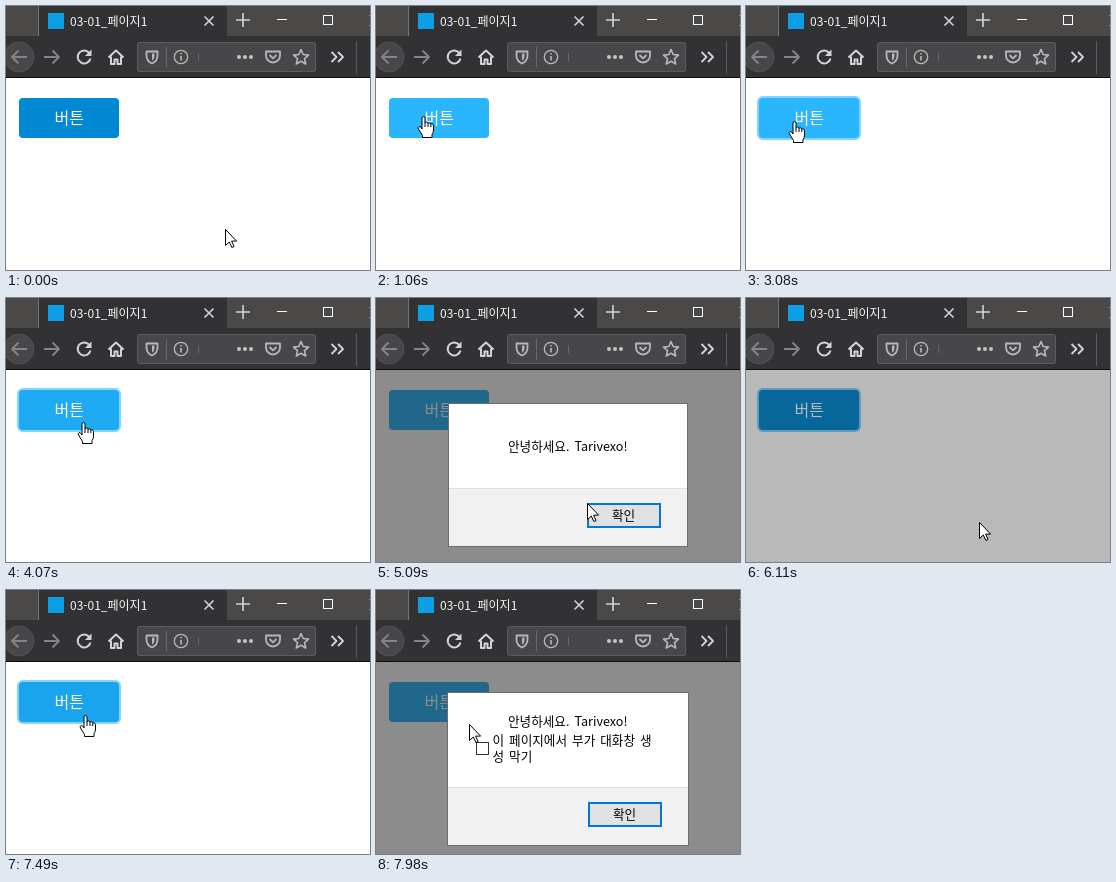
An HTML page for the animation above (8000 ms loop, 364 px wide and 264 px high).

```html
<!DOCTYPE html>
<html lang="ko">
<head>
<meta charset="utf-8">
<title>03-01_페이지1</title>
<style>
html, body { margin: 0; width: 100%; height: 100%; overflow: hidden; background: #fff; }
svg { display: block; width: 364px; height: 264px; }
text { font: 12.6px "Noto Sans CJK KR", "Noto Sans CJK", sans-serif; word-spacing: 1.5px; }
.title { font-size: 12px; fill: #f9f9fa; }
.label { font-size: 16px; fill: #fff; }
.icon { fill: none; stroke: #d4d4d6; stroke-width: 1.8; stroke-linejoin: round; }
.crisp { shape-rendering: crispEdges; }
</style>
</head>
<body>
<svg viewBox="0 0 364 264">
  <rect width="364" height="264" fill="#fff"/>

  <!-- page button -->
  <rect id="ring" x="11" y="90" width="104" height="44" rx="6" fill="#80d4ff"/>
  <rect id="btn" x="13" y="92" width="100" height="40" rx="4"/>
  <text class="label" x="48.5" y="118">버튼</text>
  <rect id="dim" y="72" width="364" height="192" fill="#1a1a1a"/>

  <!-- dialogs -->
  <g id="dlg1">
    <rect x="72.5" y="105.5" width="239" height="143" fill="#fff" stroke="#6c6c6c"/>
    <path class="crisp" d="M73 190h238v58H73z" fill="#f1f1f1"/>
    <path class="crisp" d="M73 190h238v1H73z" fill="#dfdfdf"/>
    <text x="132" y="153">안녕하세요. Tarivexo!</text>
    <rect id="ok" x="212" y="206" width="72" height="23" stroke="#0078d7" stroke-width="2"/>
    <text x="236" y="222">확인</text>
  </g>
  <g id="dlg2">
    <rect x="71.5" y="102.5" width="241" height="153" fill="#fff" stroke="#6c6c6c"/>
    <path class="crisp" d="M72 197h240v58H72z" fill="#f1f1f1"/>
    <path class="crisp" d="M72 197h240v1H72z" fill="#dfdfdf"/>
    <text x="132" y="136">안녕하세요. Tarivexo!</text>
    <text x="116.5" y="155">이 페이지에서 부가 대화창 생</text>
    <text x="116.5" y="171">성 막기</text>
    <rect x="100.5" y="152.5" width="12" height="12" fill="#fff" stroke="#333"/>
    <rect x="213" y="213" width="72" height="23" fill="#e1e1e1" stroke="#0078d7" stroke-width="2"/>
    <text x="237" y="229">확인</text>
  </g>

  <!-- browser bar -->
  <rect width="364" height="30" fill="#4b4947"/>
  <rect y="30" width="364" height="42" fill="#323234"/>
  <rect x="32" width="189" height="30" fill="#323234"/>
  <rect x="32" width="1" height="30" fill="#777573"/>
  <rect y="71" width="364" height="1" fill="#0c0c0d"/>
  <rect x="42" y="7" width="16" height="16" fill="#0d9fe5"/>
  <text class="title" x="64" y="19.5">03-01_페이지1</text>
  <g class="icon">
    <path d="M198.500 10.500l9 9m0-9l-9 9" stroke-width="1.600"/>
    <path d="M230 14h14M237 7v14" stroke-width="1.600"/>
    <path class="crisp" d="M271 13.500h10M317.500 9.500h9v9h-9z" stroke="#fff" stroke-width="1"/>
    <path d="M363.500 9.500l10 10m0-10l-10 10" stroke="#fff" stroke-width="1"/>
    <circle cx="13" cy="51" r="15" fill="#474749" stroke="#525254" stroke-width="1"/>
    <g stroke="#858587">
      <path d="M21 51H6m6.500-6.500L6 51l6.500 6.500"/>
      <path d="M38 51h15m-6.500-6.500L53 51l-6.500 6.500"/>
    </g>
    <path d="M83.500 47.200A6.500 6.500 0 1 0 84.500 52.500" stroke-width="2"/>
    <path d="M85.500 43.500v6.500H79z" fill="#d4d4d6" stroke="none"/>
    <path d="M102.500 51.500l7.500-7 7.500 7M105 50.500v7.500h3.500v-4.500h3v4.500h3.500v-7.500" stroke-width="2"/>
    <rect x="131.500" y="36.500" width="178" height="29" rx="2" fill="#474749" stroke="#5c5c5e" stroke-width="1"/>
    <g stroke="#b8b8ba" stroke-width="1.800">
      <path d="M140.500 45.500h11v4q0 5.500-5.500 8-5.500-2.500-5.500-8z"/>
      <path d="M146 47.500h2.500v2.500q0 3-2.500 4.700z" fill="#b8b8ba" stroke="none"/>
      <circle cx="175" cy="51" r="6.700" stroke-width="1.300"/>
      <path d="M175 50v4.500M175 47v1.600" stroke-width="1.600"/>
      <path d="M260 45.500h14v4a7 7 0 0 1-14 0zM263.500 49l3.500 3.300 3.500-3.300"/>
      <path d="M295 43.500l2.200 5 5.300.6-4 3.600 1.200 5.300-4.700-2.700-4.700 2.700 1.200-5.300-4-3.600 5.300-.6z" stroke-width="1.600"/>
    </g>
    <path class="crisp" d="M160.500 41v21M192.500 47v8" stroke="#68686a" stroke-width="1"/>
    <path class="crisp" d="M350.500 35v33" stroke="#5c5c5e" stroke-width="1"/>
    <path d="M325.500 46l5 5-5 5m6.500-10l5 5-5 5"/>
  </g>
  <g fill="#c4c4c6">
    <circle cx="233" cy="51" r="2"/><circle cx="239" cy="51" r="2"/><circle cx="245" cy="51" r="2"/>
  </g>

  <!-- pointer -->
  <g id="cursor" fill="#fff" stroke="#000" stroke-linejoin="round">
    <path id="arrow" d="M.500 .500V16.500L4.300 13l2.600 5.500 2.200-1-2.500-5.400h5z"/>
    <path id="hand" d="M-2 13V2Q-2 .500-.500 .500T1 2V7Q1 6 2.500 6T4 7.500Q4 6.800 5.300 6.800T6.800 8.300Q7 7.800 8 7.800T9.500 9.500V14Q9.500 17 8 18.500V21.500H-1.500V19.500L-5.500 13Q-6.500 11-5 10.500T-2 13ZM1 7V11M4 7.500V11M6.800 8.300V11"/>
  </g>
</svg>
<script>
const LOOP = 8000;
const BASE = [0, 136, 210], HOVER = [41, 182, 255];
const OK_FILL = ['#e1e1e1', '#e5f1fb', '#cce4f7'];
const el = id => document.getElementById(id);
const [ring, btn, dim, dlg1, dlg2, ok, cursor, arrow, hand] =
  ['ring', 'btn', 'dim', 'dlg1', 'dlg2', 'ok', 'cursor', 'arrow', 'hand'].map(el);

const states = [{ t: 0, x: 219, y: 223, hover: 0, ring: 0, dim: 0, d1: 0, d2: 0, ok: 0 }];
const step = (t, change) => states.push({ ...states[states.length - 1], ...change, t });

// n evenly spaced steps from t0 to t1, each described by change(k)
function run(t0, t1, n, change) {
  for (let k = 0; k < n; k++) step(t0 + (t1 - t0) * k / (n - 1), change(k));
}
const move = (pts, more = () => ({})) => k => ({ x: pts[k][0], y: pts[k][1], ...more(k) });

run(680, 1060, 6, move([[206, 215], [166, 189], [113, 156], [77, 131], [53, 115], [48, 110]],
  k => ({ hover: Math.max(0, (k - 2) / 3) })));
run(1840, 2070, 4, k => ({ ring: 1, hover: [0.6, 0.5, 0.8, 1][k] }));
run(3080, 3380, 5, move([[49, 115], [56, 136], [66, 160], [73, 174], [76, 179]],
  k => ({ hover: [1, 0.7, 0.35, 0.1, 0][k] })));
run(3930, 4070, 3, move([[77, 158], [78, 130], [78, 124]], k => ({ hover: [0, 0.35, 0.75][k] })));
run(4390, 4620, 4, k => k
  ? { ring: 0, hover: 1, dim: 0.5 * k / 3, d1: [0, 0.4, 0.8, 1][k] }
  : { hover: 0.6, dim: 0.05 });
run(4780, 5090, 5, move([[88, 131], [120, 152], [160, 178], [194, 197], [211, 205]]));
run(5170, 5330, 3, move([[222, 217], [229, 228], [230, 231]], k => ({ ok: k < 2 ? 1 : 0 })));
step(5730, { x: 232 });
step(5790, { x: 233 });
step(5960, { y: 224, ok: 2 });
run(6110, 6270, 3, k => ({ d1: 0, ok: 0, ring: 1, hover: 0, dim: [0.3, 0.12, 0][k] }));
run(6880, 7190, 5, move([[224, 217], [190, 195], [145, 166], [106, 142], [89, 132]]));
run(7270, 7660, 6, k => ({
  x: 80, y: 125,
  hover: [0.35, 0.75, 0.6, 1, 1, 1][k],
  ring: k < 3 ? 1 : 0,
  dim: [0, 0, 0, 0.2, 0.4, 0.5][k],
  d2: [0, 0, 0, 0.4, 0.8, 1][k]
}));
step(7980, { x: 93, y: 134 });

function draw(t) {
  const s = states.findLast(p => p.t <= t + 0.01);
  const mix = BASE.map((v, i) => Math.round(v + (HOVER[i] - v) * s.hover));
  const over = !s.d1 && !s.d2 && !s.dim && s.x >= 13 && s.x < 113 && s.y >= 92 && s.y < 132;
  btn.setAttribute('fill', `rgb(${mix})`);
  ring.setAttribute('opacity', s.ring);
  dim.setAttribute('opacity', s.dim);
  dlg1.setAttribute('opacity', s.d1);
  dlg2.setAttribute('opacity', s.d2);
  ok.setAttribute('fill', OK_FILL[s.ok]);
  cursor.setAttribute('transform', `translate(${s.x} ${s.y})`);
  arrow.setAttribute('opacity', over ? 0 : 1);
  hand.setAttribute('opacity', over ? 1 : 0);
}

const start = performance.now();
function tick() {
  draw((performance.now() - start) % LOOP);
  requestAnimationFrame(tick);
}
tick();
</script>
</body>
</html>
```
